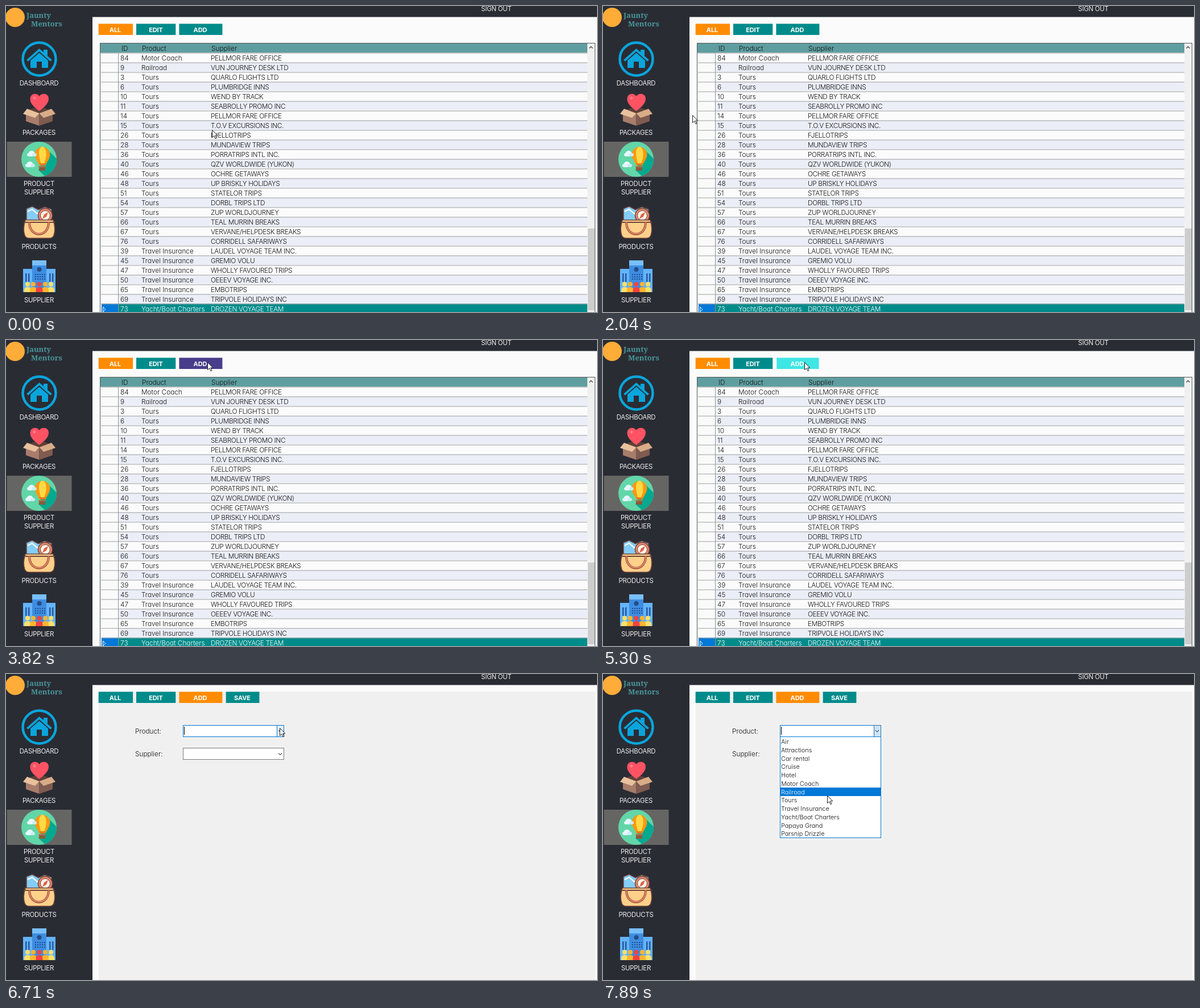
An HTML page with a canvas that plays this animation: 1039 px wide and 539 px high, repeating every 8 s.

```html
<!DOCTYPE html>
<html lang="en">
<head>
<meta charset="utf-8">
<title>Product supplier</title>
<style>
html, body { margin: 0; width: 100%; height: 100%; overflow: hidden; background: #fbfbfb; }
canvas, svg { position: absolute; left: 0; top: 0; width: 1039px; height: 539px; }
text { font: 300 11.8px Inter, sans-serif; font-feature-settings: "cv11"; fill: #111; white-space: pre; }
.caps { letter-spacing: -.35px; }
.menu { font-size: 11.5px; font-weight: 400; letter-spacing: -.3px; fill: #ececec; text-anchor: middle; }
.button { font-size: 11px; font-weight: 700; letter-spacing: -.1px; fill: #fff; text-anchor: middle; }
.item { font-size: 10.9px; }
.light { fill: #fff; }
.brand { font: 700 13px "Noto Serif", serif; fill: #489799; }
</style>
</head>
<body>
<canvas id="stage" width="1039" height="539"></canvas>
<svg id="overlay" viewBox="0 0 1039 539">
  <g id="chrome"></g>
  <g id="tableText"></g>
  <g id="formText"></g>
  <g id="listText"></g>
  <path id="cursor" d="M.5 .5V13.5L3.6 10.7 6 15.7 8 14.8 5.7 9.9H9.8Z" fill="#fff" stroke="#222" stroke-width="1"/>
</svg>
<script>
const LOOP = 8000;
const TEAL = '#008b8b', ORANGE = '#ff8c00', INDIGO = '#483d8b', AQUA = '#3ee6e4', BLUE = '#0078d7';
const DARK = '#2a2c34', PANEL = '#f0f0f0';
const ROW_TOP = 82.5, ROW_H = 17, ITEM_TOP = 111, ITEM_H = 14.75;
const $ = id => document.getElementById(id);
const ctx = $('stage').getContext('2d');

const suppliers = `84|Motor Coach|PELLMOR FARE OFFICE
9|Railroad|VUN JOURNEY DESK LTD
3|Tours|QUARLO FLIGHTS LTD
6|Tours|PLUMBRIDGE INNS
10|Tours|WEND BY TRACK
11|Tours|SEABROLLY PROMO INC
14|Tours|PELLMOR FARE OFFICE
15|Tours|T.O.V EXCURSIONS INC.
26|Tours|FJELLOTRIPS
28|Tours|MUNDAVIEW TRIPS
36|Tours|PORRATRIPS INTL INC.
40|Tours|QZV WORLDWIDE (YUKON)
46|Tours|OCHRE GETAWAYS
48|Tours|UP BRISKLY HOLIDAYS
51|Tours|STATELOR TRIPS
54|Tours|DORBL TRIPS LTD
57|Tours|ZUP WORLDJOURNEY
66|Tours|TEAL MURRIN BREAKS
67|Tours|VERVANE/HELPDESK BREAKS
76|Tours|CORRIDELL SAFARIWAYS
39|Travel Insurance|LAUDEL VOYAGE TEAM INC.
45|Travel Insurance|GREMIO VOLU
47|Travel Insurance|WHOLLY FAVOURED TRIPS
50|Travel Insurance|OEEEV VOYAGE INC.
65|Travel Insurance|EMBOTRIPS
69|Travel Insurance|TRIPVOLE HOLIDAYS INC
73|Yacht/Boat Charters|DROZEN VOYAGE TEAM`.split('\n').map(r => r.split('|'));

const products = ['Air', 'Attractions', 'Car rental', 'Cruise', 'Hotel', 'Motor Coach', 'Railroad',
  'Tours', 'Travel Insurance', 'Yacht/Boat Charters', 'Papaya Grand', 'Parsnip Drizzle'];

// Pointer stops: time, x, y
const pointerPath = [
  [0, 362, 218], [120, 348, 223], [240, 298, 245], [360, 220, 268], [480, 130, 283], [600, 85, 286],
  [750, 84, 286], [2040, 157, 192], [2160, 188, 165], [2280, 216, 145],
  [2420, 250, 160], [2540, 313, 192], [2660, 302, 222], [2780, 275, 233],
  [3030, 290, 200], [3150, 315, 145], [3270, 331, 106], [3420, 340, 84],
  [3560, 347, 60], [3680, 352, 41], [3820, 354, 39],
  [5930, 366, 52], [6050, 386, 75], [6170, 400, 91], [6320, 440, 84], [6450, 476, 90], [6710, 481, 95],
  [7360, 470, 130], [7500, 450, 150], [7630, 422, 172], [7750, 402, 188], [7890, 394, 214]
];

function addText(parent, str, x, y, cls = '') {
  const el = document.createElementNS('http://www.w3.org/2000/svg', 'text');
  el.setAttribute('x', x);
  el.setAttribute('y', y);
  el.setAttribute('class', cls);
  el.textContent = str;
  $(parent).append(el);
  return el;
}

function rect(x, y, w, h, fill) {
  ctx.fillStyle = fill;
  ctx.fillRect(x, y, w, h);
}

function frame(x, y, w, h, fill, stroke) {
  rect(x, y, w, h, stroke);
  rect(x + 1, y + 1, w - 2, h - 2, fill);
}

function paint(d, fill, stroke, width = 1) {
  const p = new Path2D(d);
  if (fill) { ctx.fillStyle = fill; ctx.fill(p); }
  if (stroke) { ctx.strokeStyle = stroke; ctx.lineWidth = width; ctx.stroke(p); }
}

function oval(x, y, rx, ry, fill, stroke, width = 1) {
  ctx.beginPath();
  ctx.ellipse(x, y, rx, ry, 0, 0, Math.PI * 2);
  if (fill) { ctx.fillStyle = fill; ctx.fill(); }
  if (stroke) { ctx.strokeStyle = stroke; ctx.lineWidth = width; ctx.stroke(); }
}

function drawHouse() {
  oval(58.5, 93.5, 29, 29, null, '#0aa5dc', 4.5);
  paint('M36 95L58.5 75 66 81.5V77H73V88L81 95 78 97.5 58.5 80 39 97.5Z', '#0aa5dc');
  paint('M43 96L58.5 82.5 74 96V109H63V98H54V109H43Z', '#0aa5dc');
}

function drawPackage() {
  paint('M36 184L58.5 177 81 184 58.5 192Z', '#5e4038');
  paint('M58.5 185C48 177 42 171 42.5 163C43 154 54 152 58.5 159C63 152 75 154 75 163C75 171 69 177 58.5 185Z', '#ff5364');
  paint('M47 162H53M50 159V165', null, '#ff8791', 1.5);
  paint('M35 184L58.5 190V211L35 203Z', '#a87c6b');
  paint('M82 184L58.5 190V211L82 203Z', '#7f5b50');
  paint('M37 181L58.5 189 51 197 30 190Z', '#e9c19d');
  paint('M80 181L58.5 189 66 197 87 190Z', '#d9ac88');
}

function drawBalloon() {
  oval(58, 270, 31, 31, '#62d6a8');
  ctx.save();
  ctx.beginPath();
  ctx.arc(58, 270, 31, 0, Math.PI * 2);
  ctx.clip();
  paint('M74 254L95 275V305H74L57 289 62 279Z', '#00a98f');
  ctx.restore();
  paint('M59 281L53 270C46 257 56 248 64 248C72 248 82 257 75 270L69 281Z', '#ff9811');
  paint('M62 281L59 268C56 255 60 248 64 248C69 248 72 255 70 268L66 281Z', '#ffda44');
  paint('M58 277H70L68 281H60Z', '#e57b1e');
  rect(58, 283, 11, 7, '#8c5a3c');
  rect(57, 282, 13, 2, '#b5774d');
  for (const [x, y] of [[45, 260], [42, 279]]) {
    oval(x, y, 5.5, 5, '#e6f8ff');
    oval(x - 4, y + 2, 4, 3, '#e6f8ff');
    oval(x + 5, y + 2, 4, 3, '#c9eef5');
  }
}

function drawBag() {
  const line = '#70443a';
  paint('M36 379V357L46 353 57 359 68 354 80 358V381Z', '#84cdf6', line, 1.5);
  paint('M38 362L46 358 55 366 61 362', null, '#fff', 2);
  oval(69, 369, 12.5, 12.5, '#e9876e', line, 1.5);
  oval(69, 369, 8.5, 8.5, '#fff5e4', line, 1);
  paint('M74 363L71 371 64 375 67 367Z', '#df604f');
  paint('M34 377H83Q88 393 84 404Q82 409 76 409H41Q35 409 33 404Q29 393 34 377Z', '#ffd08a', line, 1.5);
  paint('M31 381H86', null, line, 2);
  paint('M41 380C40 409 76 409 75 380', null, '#a74f3f', 4);
  paint('M41 381C40 408 76 408 75 381', null, '#e79a72', 1.5);
}

function drawOffice() {
  rect(30, 463, 57, 41, '#64b4fa');
  rect(46, 448, 25, 56, '#3e8de0');
  rect(46, 448, 25, 9, '#78bffa');
  oval(58.5, 464, 4, 4, '#244d86');
  for (const x of [34, 39, 76, 81]) rect(x, 471, 2.5, 15, '#2658a0');
  for (let y = 472; y < 484; y += 4) for (let x = 51; x < 68; x += 4) rect(x, y, 2, 2, '#1d4c93');
  const crowd = [[38, '#ffe06a'], [79, '#ffe06a'], [48, '#ffb52f'], [69, '#ffb52f'], [58.5, '#f34242']];
  for (const [x, color] of crowd) {
    oval(x, 490, 4, 4, color);
    paint(`M${x - 6} 504V500Q${x - 5} 495 ${x} 495Q${x + 5} 495 ${x + 6} 500V504Z`, color);
  }
}

function drawSidebar(hover) {
  rect(0, 0, 1039, 19.4, DARK);
  rect(0, 0, 152, 539, DARK);
  oval(16, 20, 17, 17, '#ffac38');
  rect(1.5, 239, 114, 62, hover ? '#747573' : '#656663');
  drawHouse();
  drawPackage();
  drawBalloon();
  drawBag();
  drawOffice();
}

function drawTable() {
  frame(165, 65, 871, 480, '#fafafa', '#50585a');
  rect(166, 66, 856, ROW_TOP - 66, '#5f9ea0');
  suppliers.forEach((_, i) => {
    const y = ROW_TOP + ROW_H * i, selected = i === suppliers.length - 1;
    rect(198, y, 824, ROW_H, selected ? TEAL : i % 2 ? '#ebeef7' : '#fbfbfb');
    if (selected) rect(168, y, 29, ROW_H, BLUE);
    rect(167, y, 855, 1, '#a0a0a0');
  });
  rect(197, 83, 1, 456, '#8f9499');
  paint('M170.5 530V539L175 534.5Z', BLUE, '#fff', 1);
  rect(1022, 66, 13, 473, PANEL);
  rect(1023, 392, 12, 144, '#cdcdcd');
  paint('M1025.5 74.5L1028.5 71.5 1031.5 74.5', null, '#505050', 1.5);
}

function chevron(y) {
  paint(`M479 ${y - 1.5}L482 ${y + 1.5} 485 ${y - 1.5}`, null, '#555', 1.1);
}

function drawForm(t, hot) {
  const open = t >= 6970;
  rect(163, 31, 873, 508, PANEL);
  frame(311, 90, 178, 21, '#fff', BLUE);
  if (t >= 6710) frame(476, 90, 13, 21, open ? '#cce4f7' : '#e5f1fb', open ? '#2670ab' : BLUE);
  chevron(100.5);
  frame(311, 130, 178, 21, '#fff', '#7a7a7a');
  chevron(141);
  const caretOff = (t >= 5930 && t < 6450) || (t >= 6970 && t < 7500);
  if (!caretOff) rect(313, 93, 1, 14, '#000');
  if (open) {
    frame(311, 110, 178, 179, '#fff', BLUE);
    if (hot >= 0) rect(312, Math.round(ITEM_TOP + hot * ITEM_H), 176, 15, BLUE);
  }
}

function drawButtons(t, form) {
  const pressed = t >= 5300 && t < 5420;
  const hovered = t >= 3680 && t < 5930;
  const button = (x, w, fill) => rect(x, 31.3, w, 19.7, fill);
  button(162.7, 60.4, form ? TEAL : ORANGE);
  button(229, 69.3, TEAL);
  if (pressed) button(305.3, 74.2, AQUA);
  else button(304.4, 76, hovered ? INDIGO : form ? ORANGE : TEAL);
  if (form) button(386.7, 58.7, TEAL);
}

function buildText() {
  addText('chrome', 'Jaunty', 36, 21, 'brand');
  addText('chrome', 'Mentors', 44, 36, 'brand');
  addText('chrome', 'SIGN OUT', 862, 9, 'menu');
  const labels = [['DASHBOARD', 139.5], ['PACKAGES', 226.5], ['PRODUCT', 316.5], ['SUPPLIER', 331.5],
    ['PRODUCTS', 427.5], ['SUPPLIER', 522]];
  for (const [s, y] of labels) addText('chrome', s, 58, y, 'menu');
  for (const [s, x] of [['ALL', 192], ['EDIT', 263.5], ['ADD', 341.5]]) addText('chrome', s, x, 45.5, 'button');
  addText('formText', 'SAVE', 415.5, 45.5, 'button');
  addText('formText', 'Product:', 227, 104.5);
  addText('formText', 'Supplier:', 227, 144.5);

  [['ID', 203], ['Product', 239], ['Supplier', 361]].forEach(([s, x]) => addText('tableText', s, x, 79));
  suppliers.forEach((row, i) => {
    const tone = i === suppliers.length - 1 ? ' light' : '';
    const y = ROW_TOP + ROW_H * i + 13.5;
    row.forEach((s, c) => addText('tableText', s, [201, 238, 360][c], y, (c === 2 ? 'caps' : '') + tone));
  });
  return products.map((s, i) => addText('listText', s, 313, ITEM_TOP + i * ITEM_H + 12, 'item'));
}

const itemTexts = buildText();
const show = (id, on) => { $(id).style.display = on ? '' : 'none'; };

function render(now) {
  const t = now % LOOP, form = t >= 5420;
  const [, x, y] = pointerPath.findLast(stop => stop[0] <= t);
  const hot = t >= 7360 ? Math.floor((y - ITEM_TOP) / ITEM_H) : -1;

  rect(0, 0, 1039, 539, '#fbfbfb');
  drawSidebar(x < 115);
  if (form) drawForm(t, hot); else drawTable();
  drawButtons(t, form);

  show('tableText', !form);
  show('formText', form);
  show('listText', t >= 6970);
  itemTexts.forEach((el, i) => el.classList.toggle('light', i === hot));
  $('cursor').setAttribute('transform', `translate(${x} ${y})`);
}

const start = performance.now();
function tick() {
  render(performance.now() - start);
  requestAnimationFrame(tick);
}
tick();
</script>
</body>
</html>
```
